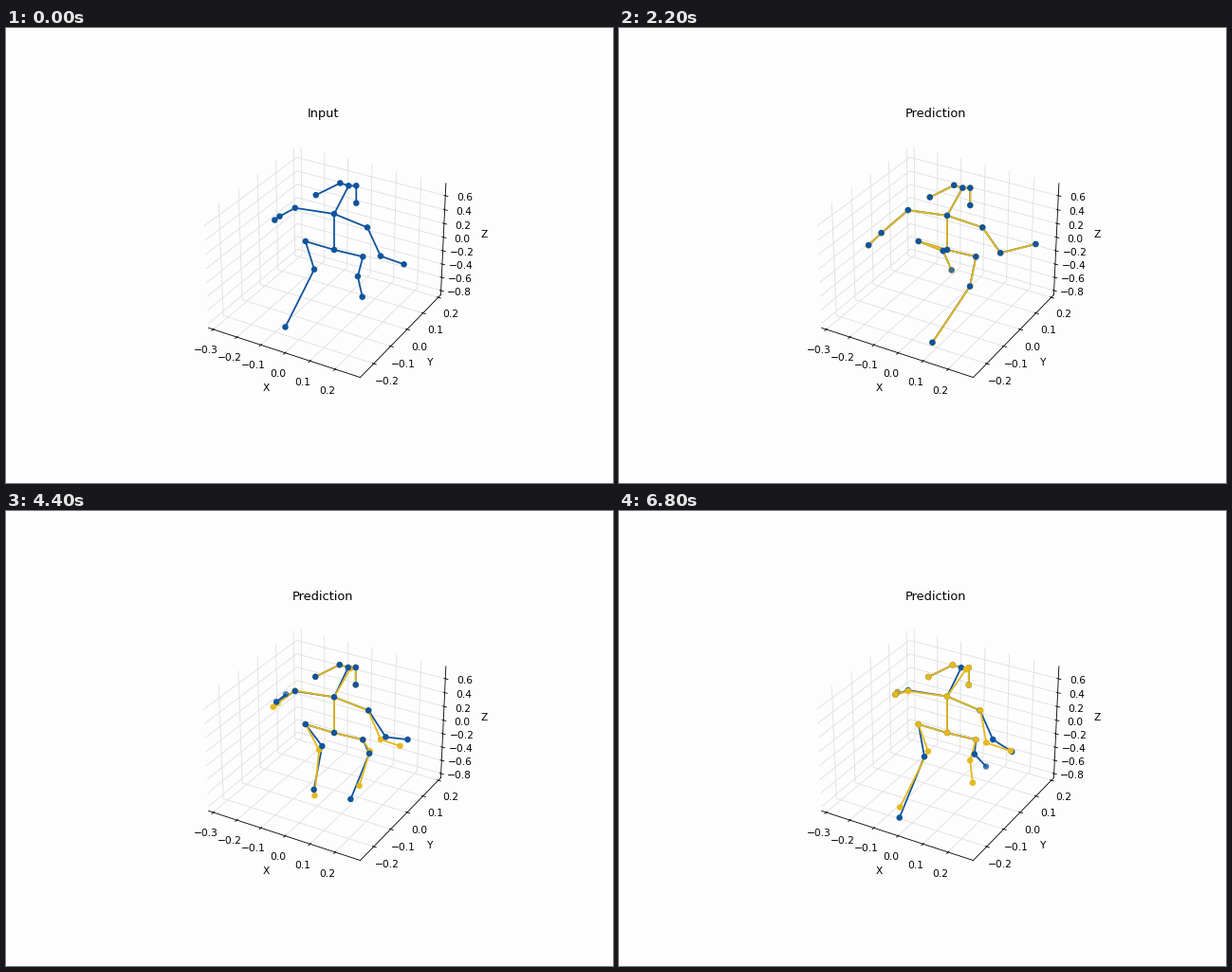
Recreate the animation shown at these times as a matplotlib script. Size 640 by 480 pixels, loop 7 s.

```python
import math
import numpy as np
import matplotlib.pyplot as plt
from matplotlib.animation import FuncAnimation

W, H, DPI = 640, 480, 100
STEP, FRAMES = 200, 35
CYCLE = 7400             # ms for one full stride
PREDICT_FROM = 2000      # ms, the predicted pose joins the real one
PREDICT_SPAN = 4800
PRED_ON_TOP = 5200       # ms, predicted joints cover the real ones
K = 0.77                 # scale of the plot within the stage
BLUE, GOLD, PAPER = "#10549c", "#e5b81c", "#fdfdfd"

# Each swinging joint: centre + a * cos(phase) + b * sin(phase), in pixels
SWING = {
    "r_knee": ((332, 247.7), (-7, 7), (8, -11)),
    "r_foot": ((323, 291.5), (-16.5, 18), (13.5, -27)),
    "l_knee": ((375.4, 262), (-4.5, 0), (-7, 11)),
    "l_foot": ((360.7, 300.7), (15, -22), (-27, 30)),
    "r_shoulder": ((304.8, 190.4), (0, -0.6), (0, 1.6)),
    "r_elbow": ((284.5, 203.7), (4, -5), (-7, 11.5)),
    "r_hand": ((283.3, 205), (0, -2.4), (-21, 24.5)),
    "l_shoulder": ((382, 210.4), (-1, 0), (1, 0)),
    "l_elbow": ((398.7, 239), (-3.7, 1.6), (2.5, -1.3)),
    "l_hand": ((425.6, 241.3), (-6, 8), (12.6, -11.5)),
    "neck": ((346, 196.6), (0, -0.5), (0, 1.2)),
    "nose": ((361.3, 166.4), (0, 0), (1, 2.4)),
}
# Extra kick of the feet, twice per stride
KICK = {"r_foot": (-12, 6), "l_foot": (0, 5)}
FIXED = {"pelvis": (346, 234), "r_hip": (315.8, 225), "l_hip": (376.3, 241.3)}
# Parts of the face, relative to the nose
FACE = {"r_eye": (-9, -2.8), "r_ear": (-34.5, 9.8),
        "l_eye": (8, 0), "l_ear": (8, 18.3)}
# How far the prediction ends up off the true place
DRIFT = {"l_elbow": (-8, 4), "l_hand": (-8, 5), "nose": (5, 2)}

CHAINS = [
    ["pelvis", "r_hip", "r_knee", "r_foot"],
    ["pelvis", "l_hip", "l_knee", "l_foot"],
    ["pelvis", "neck", "nose"],
    ["nose", "r_eye", "r_ear"],
    ["nose", "l_eye", "l_ear"],
    ["neck", "r_shoulder", "r_elbow", "r_hand"],
    ["neck", "l_shoulder", "l_elbow", "l_hand"],
]
JOINTS = [*FIXED, *SWING, *FACE]


def swing(name, t):
    phase = 2 * math.pi * t / CYCLE
    centre, a, b = np.array(SWING[name])
    kick = np.array(KICK.get(name, (0, 0)))
    return (centre + a * math.cos(phase) + b * math.sin(phase)
            + kick * math.cos(2 * phase))


def add_face(pose, nose):
    for name, offset in FACE.items():
        pose[name] = nose + offset
    return pose


def real_pose(t):
    pose = {name: np.array(p) for name, p in FIXED.items()}
    pose.update({name: swing(name, t) for name in SWING})
    return add_face(pose, pose["nose"])


def predicted_pose(t):
    """Runs ever further ahead, while the right arm lags and catches up."""
    pose = real_pose(t)
    face_anchor = pose["nose"]
    done = (t - PREDICT_FROM) / PREDICT_SPAN
    lead = 0.15 * (t - PREDICT_FROM)
    lag = 500 * math.sin(math.pi * done)
    for name in SWING:
        if name in ("r_elbow", "r_hand"):
            pose[name] = swing(name, t - lag)
        elif name not in ("neck", "nose"):
            pose[name] = swing(name, t + lead)
    for name, drift in DRIFT.items():
        pose[name] = pose[name] + done * np.array(drift)
    return add_face(pose, face_anchor)


def shade(pose):
    """Limb ends that point away from the viewer are paler."""
    alpha = np.ones(len(JOINTS))
    for foot in ("r_foot", "l_foot"):
        if pose[foot][1] < 270:
            alpha[JOINTS.index(foot)] = 0.75
    if pose["r_hand"][1] < pose["r_elbow"][1] - 2:
        alpha[JOINTS.index("r_hand")] = 0.7
    return alpha


class Skeleton:
    def __init__(self, ax, color, zorder):
        self.bones, = ax.plot([], [], color=color, lw=1.3, zorder=zorder,
                              solid_capstyle="round")
        self.dots = ax.scatter([0] * len(JOINTS), [0] * len(JOINTS), s=22,
                               color=color, linewidths=0, zorder=zorder + 5)

    def show(self, pose):
        path = []
        for chain in CHAINS:
            path += [pose[name] for name in chain] + [(np.nan, np.nan)]
        self.bones.set_data(*np.array(path).T)
        self.dots.set_offsets([pose[name] for name in JOINTS])
        self.dots.set_alpha(shade(pose))

    def set_visible(self, on):
        self.bones.set_visible(on)
        self.dots.set_visible(on)


plt.rcParams.update({
    "font.family": "DejaVu Sans",
    "axes.linewidth": 0.8 * K,
    "grid.linewidth": 0.8 * K,
    "grid.color": "#e0e0e0",
    "xtick.major.width": 0.8 * K,
    "ytick.major.width": 0.8 * K,
})

fig = plt.figure(figsize=(W / DPI, H / DPI), dpi=DPI, facecolor=PAPER)
box = fig.add_axes([0.128 + 0.125 * K, 0.11 + 0.11 * K, 0.775 * K, 0.77 * K],
                   projection="3d")
box.patch.set_visible(False)
box.view_init(elev=30, azim=-60)
box.set_xticks(np.arange(-3, 3) / 10)
box.set_yticks(np.arange(-2, 3) / 10)
box.set_zticks(np.arange(-4, 4) / 5)
box.set_xlim(-0.320, 0.298)
box.set_ylim(-0.276, 0.217)
box.set_zlim(-0.865, 0.774)
box.tick_params(labelsize=10 * K, pad=11.5 * K - 8)
for axis, name in zip((box.xaxis, box.yaxis, box.zaxis), "XYZ"):
    axis.set_pane_color((1, 1, 1, 0))
    axis.set_label_text(name, fontsize=10 * K)
    axis.labelpad = 25 * K - 21
    for tick in axis.get_major_ticks():
        tick.label1.set_va("top")
title = box.set_title("Input", fontsize=12 * K, pad=7 * K, y=1.0)
title.set_y(1.0)  # 3D axes lower their title on their own

stage = fig.add_axes([0, 0, 1, 1], zorder=5)
stage.axis("off")
real = Skeleton(stage, BLUE, 2)
predicted = Skeleton(stage, GOLD, 3)
stage.set_xlim(0, W)
stage.set_ylim(H, 0)


def update(i):
    t = i * STEP
    predicting = t >= PREDICT_FROM
    real.show(real_pose(t))
    title.set_text("Prediction" if predicting else "Input")
    predicted.set_visible(predicting)
    if predicting:
        predicted.show(predicted_pose(t))
    predicted.dots.set_zorder(8 if t >= PRED_ON_TOP else 6)
    return []


anim = FuncAnimation(fig, update, frames=FRAMES, interval=STEP,
                     repeat=True, repeat_delay=0, blit=False)
plt.show()
```
